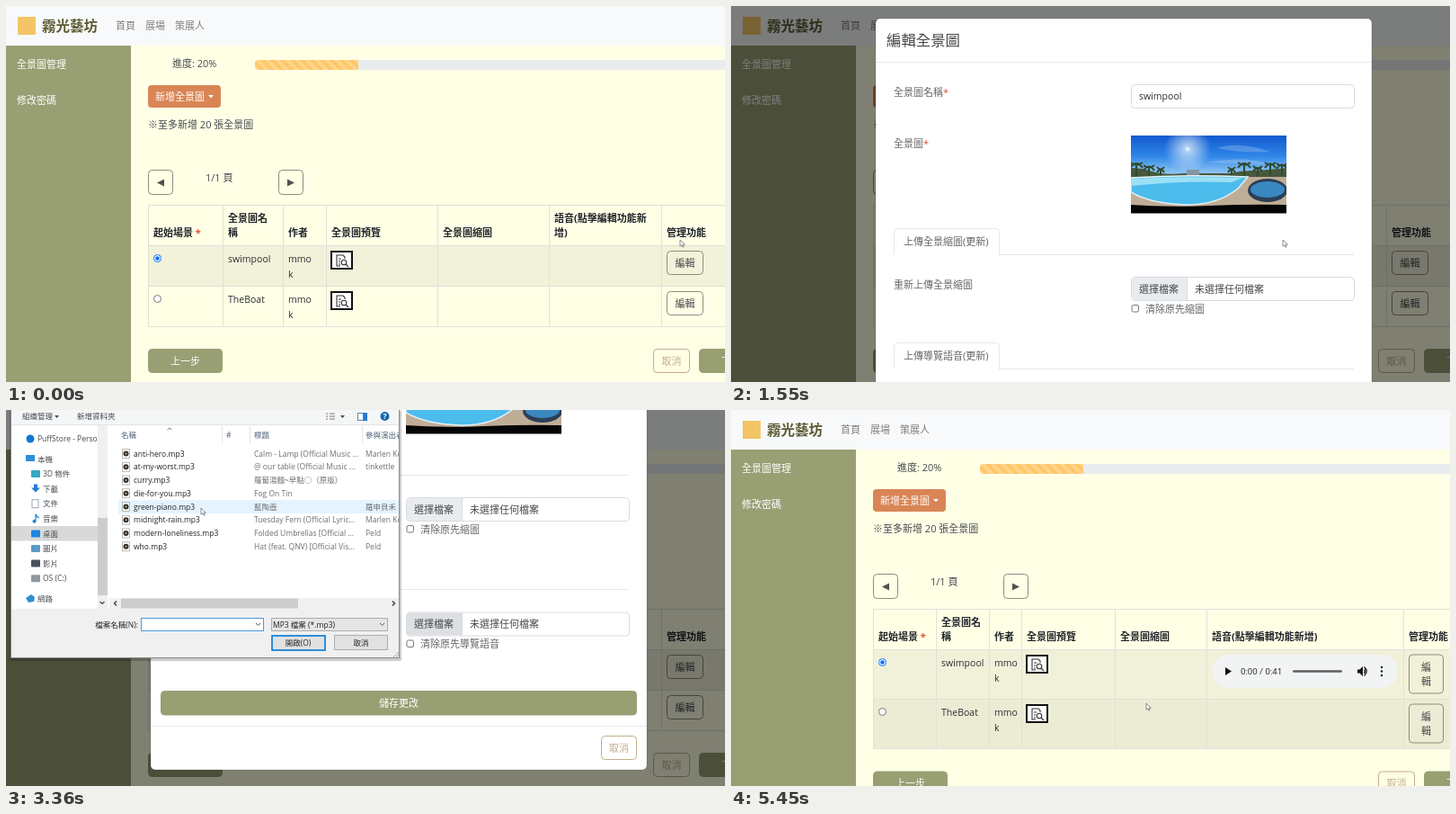
An HTML page for the animation above (6 s loop, 800 by 418 pixels).

```html
<!DOCTYPE html>
<html lang="zh-Hant">
<head>
<meta charset="utf-8">
<title>全景圖管理</title>
<style>
html, body { margin: 0; width: 100%; height: 100%; overflow: hidden; }
svg { display: block; font: 11px "Open Sans", "Noto Sans CJK TC", "Noto Sans CJK", sans-serif; }
</style>
</head>
<body>
<svg id="stage" width="800" height="418" viewBox="0 0 800 418"></svg>
<script>
const OLIVE = '#989f73', INK = '#45484c', LABEL = '#636568', LINE = '#e5e8eb', FIELD = '#d8dce0', TAN = '#c3ad8c';
const $ = id => document.getElementById(id);

// Text is placed by the vertical centre of its line.
const text = (x, y, s, fill = INK, attrs = '') =>
  `<text x="${x}" y="${y}" dy=".37em" fill="${fill}" ${attrs}>${s}</text>`;
const latin = (x, y, s) => text(x, y, s, '#2b2e31', 'font-size="10.5"');
const rect = (x, y, w, h, fill, attrs = '') =>
  `<rect x="${x}" y="${y}" width="${w}" height="${h}" fill="${fill}" ${attrs}/>`;
const path = (d, fill, attrs = '') => `<path d="${d}" fill="${fill}" ${attrs}/>`;
const line = (d, stroke = LINE, width = 1) => path(d, 'none', `stroke="${stroke}" stroke-width="${width}"`);
const circle = (x, y, r, fill, attrs = '') => `<circle cx="${x}" cy="${y}" r="${r}" fill="${fill}" ${attrs}/>`;
const group = (id, body, attrs = '') => `<g id="${id}" ${attrs}>${body}</g>`;
const star = '<tspan fill="#e0532f">*</tspan>';

const button = (x, y, w, h, label, fill, color = '#fff', stroke = fill) =>
  rect(x + .5, y + .5, w - 1, h - 1, fill, `rx="4" stroke="${stroke}"`) +
  text(x + w / 2, y + h / 2, label, color, 'text-anchor="middle"');

const audio = (x, y) =>
  rect(x, y, 207, 37, '#f1f3f4', 'rx="18.5"') +
  path(`M${x + 15} ${y + 14}l7 4.5-7 4.5z`, '#111') +
  text(x + 32, y + 18.5, '0:00 / 0:41', '#333', 'font-size="9.7" font-family="Roboto, sans-serif"') +
  rect(x + 90, y + 17.2, 55, 2.6, '#5f5f5f', 'rx="1.3"') +
  path(`M${x + 162} ${y + 16.5}h2.5l3.5-3.5v11l-3.5-3.5h-2.5z`, '#111') +
  line(`M${x + 169.5} ${y + 16}q2 2.5 0 5M${x + 169.5} ${y + 13.5}q5.5 5 0 10`, '#111', 1.2) +
  [14, 18.5, 23].map(d => circle(x + 189, y + d, 1.2, '#111')).join('');

const previewIcon = (x, y) =>
  rect(x + 1, y + 1, 23, 19, '#fff', 'stroke="#111" stroke-width="2"') +
  line(`M${x + 11} ${y + 17}h-4v-12h7l2 2v2M${x + 9} ${y + 9}h3m-3 3h2m-2 3h2M${x + 17} ${y + 15}l3 3`, '#333', 1.1) +
  circle(x + 15, y + 13, 2.8, 'none', 'stroke="#333" stroke-width="1.1"');

function table(id, cols, rows, headers, shades, tall) {
  let out = '';
  shades.forEach((a, i) => out += rect(158, rows[i], 642, rows[i + 1] - rows[i], '#000', `opacity="${a}"`));
  out += line([221, ...rows].map(y => `M158 ${y + .5}H800`).join('') +
    cols.map(x => `M${x + .5} 221V${rows[2]}`).join(''), '#e0e2da');
  headers.forEach((h, i) => h.split('|').reverse().forEach((s, n) =>
    out += text(cols[i] + 6, 252 - 16 * n, s, '#212529', 'font-weight="700"')));
  ['swimpool', 'TheBoat'].forEach((name, i) => {
    const y = rows[i], [, b, c, d] = cols, e = cols[6];
    out += circle(168.5, y + 14.5, 4, '#fff', `stroke="${i ? '#777' : '#0d6efd'}"`) +
      (i ? '' : circle(168.5, y + 14.5, 2.3, '#0d6efd')) +
      latin(b + 6, y + 15, name) + latin(c + 6, y + 15, 'mmo') + latin(c + 6, y + 32, 'k') +
      previewIcon(d + 5, y + 6);
    out += tall
      ? button(e + 6, y + 5.5, 39, 44, '', 'none', '', '#8c8c7a') +
        text(e + 20, y + 19.5, '編') + text(e + 20, y + 36, '輯')
      : button(e + 6, y + 6, 41, 27, '編輯', 'none', INK, '#8c8c7a');
  });
  return group(id, out);
}

const page =
  rect(0, 0, 800, 418, '#ffffe6') + rect(0, 0, 800, 44, '#f8f9fa') + rect(0, 44, 139, 374, OLIVE) +
  rect(13, 12, 20, 20, '#f3c566') +
  text(40, 22.5, '霧光藝坊', '#5b5a33', 'font-size="15.5" font-weight="700"') +
  [[122, '首頁'], [155, '展場'], [188, '策展人']].map(([x, s]) => text(x, 22, s, '#7c7d7d')).join('') +
  text(12, 65, '全景圖管理', '#fff') + text(12, 105, '修改密碼', '#fff') +
  text(185, 64, '進度: 20%') +
  rect(277, 60, 540, 11, '#e9ecef', 'rx="4"') +
  ['#ffc766', 'url(#stripes)'].map(fill => path('M392 60H281q-4 0-4 4v3q0 4 4 4h111z', fill)).join('') +
  rect(158, 88, 81, 25, '#d98555', 'rx="4"') + text(166, 100.5, '新增全景圖', '#fff') + path('M225 99h6l-3 3.3z', '#fff') +
  text(158, 132, '※至多新增 20 張全景圖') +
  button(158, 182, 28, 28, '', 'none', '', '#8c8c7a') + button(303, 182, 28, 28, '', 'none', '', '#8c8c7a') +
  path('M176 192.5v8l-8-4zM313 192.5v8l8-4z', '#50514d') + text(222, 191, '1/1 頁') +
  table('before', [158, 241, 308, 356, 480, 604, 729], [266, 311, 356],
    [`起始場景 ${star}`, '全景圖名|稱', '作者', '全景圖預覽', '全景圖縮圖', '語音(點擊編輯功能新|增)', '管理功能'], [.05, 0]) +
  group('after', table('', [158, 228, 287, 323, 427, 529, 748], [266, 321, 376],
    [`起始場景 ${star}`, '全景圖名|稱', '作者', '全景圖預覽', '全景圖縮圖', '語音(點擊編輯功能新增)', '管理功能'], [.055, .075], true) +
    audio(535, 272)) +
  group('actions', button(158, 381, 83, 27, '上一步', OLIVE) +
    button(720, 381, 41, 27, '取消', 'none', TAN, TAN) + button(771, 381, 83, 27, '下一步', OLIVE));

const palm = ([x, y, r]) =>
  line(`M${x} 45V${y}M${x - r} ${y + 3}Q${x} ${y - r} ${x + r} ${y + 3}M${x - r} ${y - 3}Q${x} ${y + 2} ${x + r} ${y - 3}`, '#2f4a2c', 2);
const photo = `<g transform="translate(445 144)" clip-path="url(#photoClip)">` +
  rect(0, 0, 173, 46, 'url(#sky)') + circle(63, 15, 26, 'url(#sun)') +
  path('M95 14q25-8 60 4q-28 2-60-4M85 30q40-8 70 2z', '#fff', 'opacity=".2"') +
  rect(0, 43, 173, 43, '#c0ad96') +
  path('M0 36q12 0 24 4t36 2h50q12-3 24-3t39-3v10H0z', '#47583f') +
  [[6, 33, 7], [20, 36, 6], [33, 38, 4], [112, 38, 4], [126, 33, 7], [141, 37, 5], [155, 33, 6], [168, 34, 6]].map(palm).join('') +
  rect(62, 38, 14, 6, '#8496a0') +
  path('M0 47Q60 43 130 46L120 58Q98 77 62 77Q22 76 0 63Z', '#4cbcec', 'stroke="#e3f2f5" stroke-width="1.5"') +
  path('M0 48Q60 45 124 47L112 52Q60 50 0 56Z', '#9be0f5') +
  `<ellipse cx="152" cy="61" rx="22" ry="13" fill="#2b3f55"/><ellipse cx="152" cy="60" rx="19" ry="9" fill="#3a88c0"/>` +
  path('M0 77Q40 80 86 78T173 77V87H0z', '#050505') + '</g>';

const tab = (y, label) =>
  line(`M181.5 ${y + 14.5}v-25q0-4 4-4h109q4 0 4 4v25H693`) + text(192, y, label, LABEL);

const fileInput = (y, n, check) =>
  rect(445.5, y - 13, 248, 26, '#fff', `id="field${n}" rx="4" stroke="${FIELD}"`) +
  path(`M507 ${y - 12.5}v25H449.5q-3.5 0-3.5-3.5v-18q0-3.5 3.5-3.5z`, '#e9ecef', `id="choose${n}"`) +
  line(`M507.5 ${y - 12.5}v25`, FIELD) +
  text(454, y, '選擇檔案') + text(516, y, '未選擇任何檔案', INK, `id="file${n}"`) +
  rect(446, y + 18, 7.5, 7.5, '#fff', 'rx="1.5" stroke="#767676"') + text(461, y + 22, check, LABEL);

const modal =
  rect(161, 14, 552, 590, '#fff', 'id="card" rx="5" stroke="#000" stroke-opacity=".15"') +
  text(173, 38.3, '編輯全景圖', INK, 'font-size="16.4"') + line('M161 62.5H713') +
  text(181, 95.5, '全景圖名稱' + star, LABEL) +
  rect(445.5, 87.5, 248, 26, '#fff', `rx="4" stroke="${FIELD}"`) + latin(454, 100.5, 'swimpool') +
  text(181, 152.5, '全景圖' + star, LABEL) + photo +
  tab(262, '上傳全景縮圖(更新)') + text(181, 310, '重新上傳全景縮圖', LABEL) + fileInput(314.5, 1, '清除原先縮圖') +
  tab(389, '上傳導覽語音(更新)') + text(181, 437.5, '上傳導覽語音(可選)', LABEL) +
  rect(444, 428, 251, 29, 'none', 'id="ring" rx="5" stroke="#0d6efd" stroke-opacity=".4" stroke-width="3"') +
  fileInput(442, 2, '清除原先導覽語音') +
  group('player', audio(181, 487) + button(181, 540, 39, 26, '移除', '#e0876a', '#fff', '#e39a68')) +
  group('lower', button(172, 516, 530, 27.5, '儲存更改', OLIVE) + line('M161 555.5H713') +
    button(662, 566, 40, 27, '取消', '#fff', TAN, TAN));

const songs = [
  ['anti-hero', 'Calm - Lamp (Official Music ...', 'Marlen Kov'],
  ['at-my-worst', '@ our table (Official Music ...', 'tinkettle'],
  ['curry', '蘿蔔湯麵~早點○（原版）', ''],
  ['die-for-you', 'Fog On Tin', ''],
  ['green-piano', '藍陶壺', '羅申貝禾'],
  ['midnight-rain', 'Tuesday Fern (Official Lyric...', 'Marlen Kov'],
  ['modern-loneliness', 'Folded Umbrellas [Official ...', 'Peld'],
  ['who', 'Hat (feat. QNV) [Official Vis...', 'Peld']];
const places = [['3D 物件', '#35a7c4'], ['下載', '#2b7cd3'], ['文件', '#9aa7b3'], ['音樂', '#1e88d8'],
  ['桌面', '#1c86e0'], ['圖片', '#5b9bc9'], ['影片', '#47505c'], ['OS (C:)', '#8f979e']];

const placeIcon = (y, i, c) =>
  i == 1 ? path(`M31 ${y - 5}h4v4h3l-5 5-5-5h3z`, c) :
  i == 3 ? circle(31.5, y + 3, 2, c) + line(`M33 ${y + 3}v-8q1 3 4 4`, c, 1.3) :
  i == 2 ? rect(29, y - 4.5, 7, 9, '#fff', `stroke="${c}"`) : rect(28, y - 4, 10, 8, c, 'rx="1"');

const dialog =
  rect(5, -10, 433, 286, '#fff') +
  text(35, 32, 'PuffStore - Perso') + circle(27, 32, 4.5, '#0f78d4') +
  rect(22, 50, 10, 7, '#2b8fd8') + text(35, 54.5, '本機') +
  rect(5, 129, 97, 16.5, '#d9d9d9') +
  places.map(([s, c], i) => placeIcon(71 + 16.6 * i, i, c) + text(41, 71 + 16.6 * i, s)).join('') +
  path('M22 209l6-4 4 3-1 5-6 1z', '#2b8fd8') + text(35, 209.5, '網路') +
  rect(102, 0, 336, 222, '#fff') + rect(102, 0, 11, 221, '#f0f0f0') + rect(102, 120, 11, 86, '#cdcdcd') +
  line('M104.5 213l2.5 2.5 2.5-2.5', '#444', 1.2) +
  rect(5, -10, 433, 26, '#f5f6f7') + line('M5 16.5H438', '#e3e4e6') +
  text(18, 7, '組織管理') + path('M54 6h5l-2.5 3z', INK) + text(79, 7, '新增資料夾') +
  line('M356 4h2m2 0h6M356 7h2m2 0h6M356 10h2m2 0h6', '#777') + path('M372 6h5l-2.5 3z', INK) +
  rect(391.5, 3.5, 10, 8, '#fff', 'stroke="#5f86a8"') + rect(397, 3, 5, 9, '#2b7cd3') +
  circle(421.5, 7, 5, '#1767b5') + text(421.5, 7, '?', '#fff', 'text-anchor="middle" font-weight="700"') +
  line('M179.5 22l2.5-2 2.5 2', '#777') +
  [[128, '名稱'], [245, '#'], [276, '標題'], [400, '參與演出者']].map(([x, s]) => text(x, 28, s, '#4c607a')).join('') +
  line('M240.5 18V37M271.5 18V37M396.5 18V37', '#e5e5e5') +
  rect(125, 100, 313, 15, '#e5f3ff', 'id="row"') +
  songs.map(([file, title, artist], i) => {
    const y = 48.5 + 14.75 * i;
    return rect(129.5, y - 5, 8, 10, '#fff', 'stroke="#aaa" stroke-width=".8"') + circle(133.5, y, 3, '#333') +
      circle(133.5, y, 1.1, '#e8a05a') + text(142, y, file + '.mp3', '#222') +
      text(276, y, title, '#6d6d6d') + text(400, y, artist, '#6d6d6d');
  }).join('') +
  rect(115, 209, 323, 12, '#f0f0f0') + rect(128, 209.5, 197, 11, '#cdcdcd') +
  line('M123 212.5l-2.5 2.5 2.5 2.5M430 212.5l2.5 2.5-2.5 2.5', '#333', 1.3) +
  rect(5, 221, 433, 55, '#f0f0f0') +
  text(147, 238.5, '檔案名稱(N):', '#222', 'text-anchor="end"') +
  rect(150.5, 231.5, 136, 14, '#fff', 'stroke="#4a9be0"') + text(153, 238.5, 'green-piano.mp3', '#222', 'id="chosen"') +
  rect(295.5, 231.5, 129, 14, '#e5e5e5', 'stroke="#adadad"') + text(297, 238.5, 'MP3 檔案 (*.mp3)', '#222') +
  line('M278 237l2.5 2.5 2.5-2.5M416 237l2.5 2.5 2.5-2.5', '#555') +
  rect(296, 251, 59, 16, '#e1e1e1', 'stroke="#0078d7" stroke-width="1.6"') +
  rect(365.5, 250.5, 59, 16, '#e1e1e1', 'stroke="#adadad"') +
  text(325, 258.5, '開啟(O)', '#222', 'text-anchor="middle"') + text(395, 258.5, '取消', '#222', 'text-anchor="middle"') +
  line('M431 275l6-6M434 275l3-3', '#aaa') + rect(5.5, -10, 432, 285.5, 'none', 'stroke="#8a8a8a"');

const pen = 'stroke="#666" stroke-width=".8" stroke-linejoin="round"';
$('stage').innerHTML = `<defs>
  <pattern id="stripes" x="277" y="60" width="11" height="11" patternUnits="userSpaceOnUse">
    ${path('M0 5.5V11H5.5zM0 0H5.5L11 5.5V11z', '#fff', 'opacity=".25"')}</pattern>
  <linearGradient id="sky" x2="0" y2="1"><stop stop-color="#1159cf"/><stop offset=".5" stop-color="#2f86e8"/><stop offset="1" stop-color="#a5d2f7"/></linearGradient>
  <radialGradient id="sun"><stop stop-color="#fff"/><stop offset=".12" stop-color="#fff" stop-opacity=".65"/><stop offset="1" stop-color="#fff" stop-opacity="0"/></radialGradient>
  <clipPath id="photoClip">${rect(0, 0, 173, 86.5, '#000')}</clipPath>
  <clipPath id="dialogClip">${rect(5, 0, 433, 276, '#000')}</clipPath></defs>` +
  page + rect(0, 0, 800, 418, '#000', 'id="backdrop"') + group('modal', modal) +
  group('dialog', rect(4, 0, 436, 279, '#000', 'opacity=".2" rx="2"') +
    group('', dialog, 'clip-path="url(#dialogClip)"'), 'font-size="8.5"') +
  group('cursor', path('M0 0v8l2-1.7 1.3 2.9 1.3-.6-1.3-2.7h2.6z', '#fff', `id="arrow" transform="scale(.9)" ${pen}`) +
    path('M0 1q1-2 2 0v3l4 .8q1 .4.8 1.6L6 9H1.5L-1 6q0-1 1-.5z', '#fff', `id="hand" ${pen}`));

const ramp = (t, a, b) => Math.min(1, Math.max(0, (t - a) / (b - a)));
const ease = p => p * p * (3 - 2 * p);
const set = (id, name, value) => $(id).setAttribute(name, value);
const show = (id, on) => set(id, 'visibility', on ? 'visible' : 'hidden');

const pointer = [[0, 750, 260], [550, 746, 285], [740, 746, 285], [1190, 614, 260], [1920, 614, 260],
  [2640, 571, 246], [2820, 571, 246], [3360, 217, 109], [3560, 217, 109], [4090, 322, 256], [4180, 322, 256],
  [4640, 480, 348], [4740, 480, 348], [5270, 462, 326]];

function pointerAt(t) {
  let [, x, y] = pointer[0];
  for (let i = 1; i < pointer.length; i++) {
    const p = ease(ramp(t, pointer[i - 1][0], pointer[i][0]));
    x += (pointer[i][1] - pointer[i - 1][1]) * p;
    y += (pointer[i][2] - pointer[i - 1][2]) * p;
  }
  return `translate(${x} ${y})`;
}

const STEP = 1000 / 11;

function render(now) {
  const t = Math.floor((now % 6000 + 5) / STEP) * STEP;
  const reloaded = t >= 5350; // saving reloads the page, so the form vanishes at once
  const hasFile = t >= 4170, grow = hasFile ? 80 : 0;

  show('before', !reloaded);
  show('after', reloaded);
  set('actions', 'transform', `translate(0 ${reloaded ? 20.5 : 0})`);
  set('backdrop', 'opacity', reloaded ? 0 : .5 * ramp(t, 550, 700));

  const scroll = 204 * ease(ramp(t, 1590, 1910)) + 75 * ease(ramp(t, 4260, 4640));
  const slide = 50 * (1 - ramp(t, 625, 785)) ** 2;
  set('modal', 'opacity', reloaded ? 0 : ramp(t, 600, 700));
  set('modal', 'transform', `translate(0 ${-scroll - slide})`);
  set('card', 'height', 590 + grow);
  set('lower', 'transform', `translate(0 ${grow})`);
  set('player', 'display', hasFile ? 'inline' : 'none');
  set('ring', 'display', hasFile ? 'inline' : 'none');
  set('field2', 'stroke', hasFile ? '#86b7fe' : FIELD);
  set('choose2', 'fill', t >= 2630 && !hasFile ? '#dde0e3' : '#e9ecef');
  $('file2').textContent = hasFile ? 'green-piano.mp3' : '未選擇任何檔案';

  const open = t >= 2810 && !hasFile, picked = t >= 3540;
  set('dialog', 'display', open ? 'inline' : 'none');
  set('row', 'display', t >= 3300 ? 'inline' : 'none');
  set('row', 'fill', picked ? '#cce8ff' : '#e5f3ff');
  set('chosen', 'display', picked ? 'inline' : 'none');

  const hand = t > 400 && t < 800 || t > 4900 && !reloaded;
  show('hand', hand);
  show('arrow', !hand);
  set('cursor', 'transform', pointerAt(t));
}

const start = performance.now();
(function frame() {
  render(performance.now() - start);
  requestAnimationFrame(frame);
})();
</script>
</body>
</html>
```
